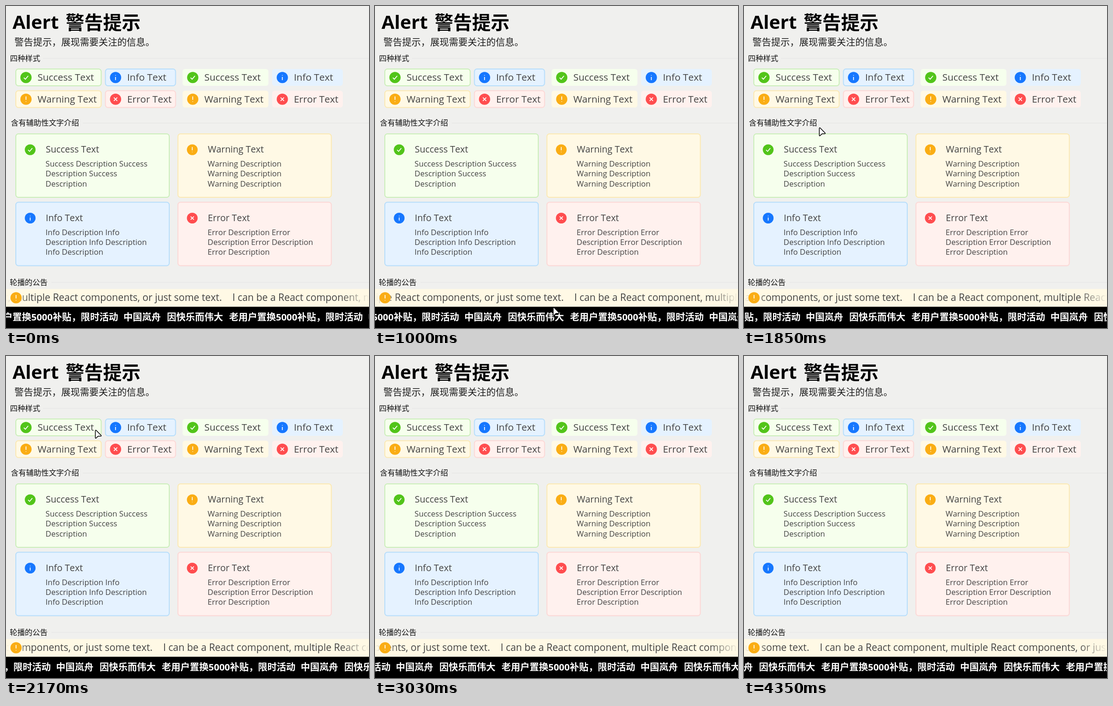
These frames come from a looping animation (776 by 690 pixels, 4.43 s). An HTML page:

```html
<!DOCTYPE html>
<html lang="zh-CN">
<head>
<meta charset="utf-8">
<title>Alert</title>
<style>
  html, body { margin: 0; width: 100%; height: 100%; overflow: hidden; background: #f0f0ee; }
  svg { display: block; }
  text {
    font-family: "Open Sans", "Noto Sans CJK SC", "Noto Sans CJK", sans-serif;
    font-kerning: none; fill: #434343; white-space: pre;
  }
  .title { font-size: 40px; font-weight: 700; fill: #000; }
  .sub { font-size: 20px; fill: #1c1c1c; }
  .label { font-size: 16.2px; fill: #111; }
  .alert { font-size: 20.5px; }
  .head { font-size: 19.4px; }
  .desc { font-size: 16.6px; }
  .notice { font-size: 20.9px; }
  .promo { font-size: 20px; font-weight: 700; fill: #fff; word-spacing: 7.8px; }
</style>
</head>
<body>
<svg id="stage" width="776" height="690" viewBox="0 0 776 690">
  <defs>
    <linearGradient id="fade">
      <stop offset="0" stop-color="#fff9e5"/>
      <stop offset="1" stop-color="#fff9e5" stop-opacity="0"/>
    </linearGradient>
  </defs>
</svg>
<script>
const stage = document.getElementById('stage');

function add(tag, attrs, parent = stage, content = '') {
  const el = document.createElementNS('http://www.w3.org/2000/svg', tag);
  for (const key in attrs) el.setAttribute(key, attrs[key]);
  el.textContent = content;
  parent.appendChild(el);
  return el;
}
const text = (cls, x, y, content, parent) => add('text', { class: cls, x, y }, parent, content);

const kinds = {
  Success: { fill: '#f6ffed', edge: '#cbeeba', icon: '#52c41a', mark: 'M-4.6 .4L-1.3 3.7L4.8 -3.5' },
  Info: { fill: '#e5f2ff', edge: '#b7defb', icon: '#1677ff', mark: 'M0 -1.2V5.6M0 -5.2V-4.2' },
  Warning: { fill: '#fff9e5', edge: '#fbe9b4', icon: '#faad14', mark: 'M0 -6V1.4M0 4.6V5.6' },
  Error: { fill: '#fff1ee', edge: '#fcd8d6', icon: '#ff4d4f', mark: 'M-3.6 -3.6L3.6 3.6M3.6 -3.6L-3.6 3.6' }
};

function icon(kind, x, y, r) {
  const g = add('g', { transform: `translate(${x} ${y}) scale(${r / 12})` });
  add('circle', { r: 12, fill: kinds[kind].icon }, g);
  add('path', { d: kinds[kind].mark, fill: 'none', stroke: '#fff', 'stroke-width': 1.7 }, g);
}

function box(kind, x, y, width, height, bordered) {
  const { fill, edge } = kinds[kind];
  const inset = bordered ? 1 : 0;
  add('rect', {
    x: x + inset, y: y + inset, width: width - 2 * inset, height: height - 2 * inset,
    rx: 5.5, fill, stroke: bordered ? edge : 'none', 'stroke-width': 2
  });
}

function alertBox(kind, x, y, width, bordered) {
  if (bordered) box(kind, x, y, width, 38, true);
  else box(kind, x + 1, y + 1, width - 1, 36, false);
  icon(kind, x + 22.7, y + 19.2, 12);
  text('alert', x + 47.4, y + 26, kind + ' Text');
}

function card(kind, x, y, lines) {
  box(kind, x, y, 330, 138, true);
  icon(kind, x + 31.7, y + 35, 11.5);
  text('head', x + 65, y + 41, kind + ' Text');
  lines.forEach((line, i) => text('desc', x + 64.6, y + 71 + i * 21.3, line));
}

function section(x, y, content, lineX) {
  text('label', x, y + 5.5, content);
  add('rect', { x: lineX, y: y - .5, width: 776 - lineX, height: 1.6, fill: '#e8e8e7' });
}

text('title', 14, 49, 'Alert');
text('title', 127.6, 50, '警告提示');
text('sub', 18, 84.5, '警告提示，展现需要关注的信息。');

section(8.5, 112, '四种样式', 79);
[[20, true], [376.5, false]].forEach(([x, bordered]) => {
  alertBox('Success', x, 134, 184.5, bordered);
  alertBox('Info', x + 191.5, 134, 152, bordered);
  alertBox('Warning', x, 180.5, 184.5, bordered);
  alertBox('Error', x + 191.5, 180.5, 152, bordered);
});

section(10.5, 250.5, '含有辅助性文字介绍', 164);
card('Success', 20, 273, ['Success Description Success', 'Description Success', 'Description']);
card('Warning', 366.5, 273, Array(3).fill('Warning Description'));
card('Info', 20, 419.5, ['Info Description Info', 'Description Info Description', 'Info Description']);
card('Error', 366.5, 419.5, ['Error Description Error', 'Description Error Description', 'Error Description']);

section(8, 592, '轮播的公告', 97);

// Scrolling strips: copies of one line spaced by the loop width
function strip(cls, y, content, gap, offsets) {
  const g = add('g', {});
  offsets.forEach(n => text(cls, n * gap, y, content, g));
  return g;
}

add('rect', { y: 606.5, width: 776, height: 38, fill: '#fff9e5' });
const notice = strip('notice', 632,
  'I can be a React component, multiple React components, or just some text.', 749, [-1, 0, 1]);
add('rect', { y: 606.5, width: 52, height: 38, fill: 'url(#fade)' });
add('rect', { y: 606.5, width: 60, height: 38, fill: 'url(#fade)', transform: 'matrix(-1 0 0 1 776 0)' });
icon('Warning', 21.5, 625.3, 12);

add('rect', { y: 644.5, width: 776, height: 46, fill: '#000' });
const promo = strip('promo', 674,
  '中国岚舟 因快乐而伟大 老用户置换5000补贴，限时活动', 523, [-1, 0, 1, 2]);

const pointer = add('path', {
  d: 'M1 2.2V17.2Q1.2 19 2.7 17.8L6.2 14.4Q6.8 13.8 7.8 13.8H12.3Q14.6 13.6 13.2 12L3 1.4Q1.3 .2 1 2.2Z',
  fill: '#fff', stroke: '#000', 'stroke-width': 1.5, 'stroke-linejoin': 'round'
});

const LOOP = 4430, STEPS = 57, STEP = LOOP / STEPS;

// Each row: step, notice x, promo x
const scroll = [
  [0, 484, 251], [13, 426, 191], [24, 361, 132], [33, 304.5, 76],
  [39, 268.5, 44.5], [47, 218.5, -5], [56, 162, -61]
];
// Each row: step, pointer x, pointer y
const path = [
  [0, 540, 700], [4, 532, 656], [9, 440, 647], [13, 380, 645], [17, 260, 545], [21, 200, 431],
  [24, 160, 260], [28, 190, 158], [31, 260, 143], [33, 315, 152], [35, 420, 202], [38, 790, 330]
];

function at(rows, step) {
  let i = 1;
  while (i < rows.length - 1 && rows[i][0] < step) i++;
  const [a, b] = [rows[i - 1], rows[i]];
  const k = Math.min(1, (step - a[0]) / (b[0] - a[0]));
  return [1, 2].map(n => a[n] + (b[n] - a[n]) * k);
}
const move = (el, x, y) => el.setAttribute('transform', `translate(${x} ${y})`);

const start = performance.now();
function draw(now) {
  const time = Math.max(0, now - start) % LOOP;
  const step = Math.min(STEPS - 1, Math.floor(time / STEP + .25));
  const [noticeX, promoX] = at(scroll, step);
  move(notice, noticeX, 0);
  move(promo, promoX, 0);
  move(pointer, ...at(path, step));
  requestAnimationFrame(draw);
}
draw(start);
</script>
</body>
</html>
```
